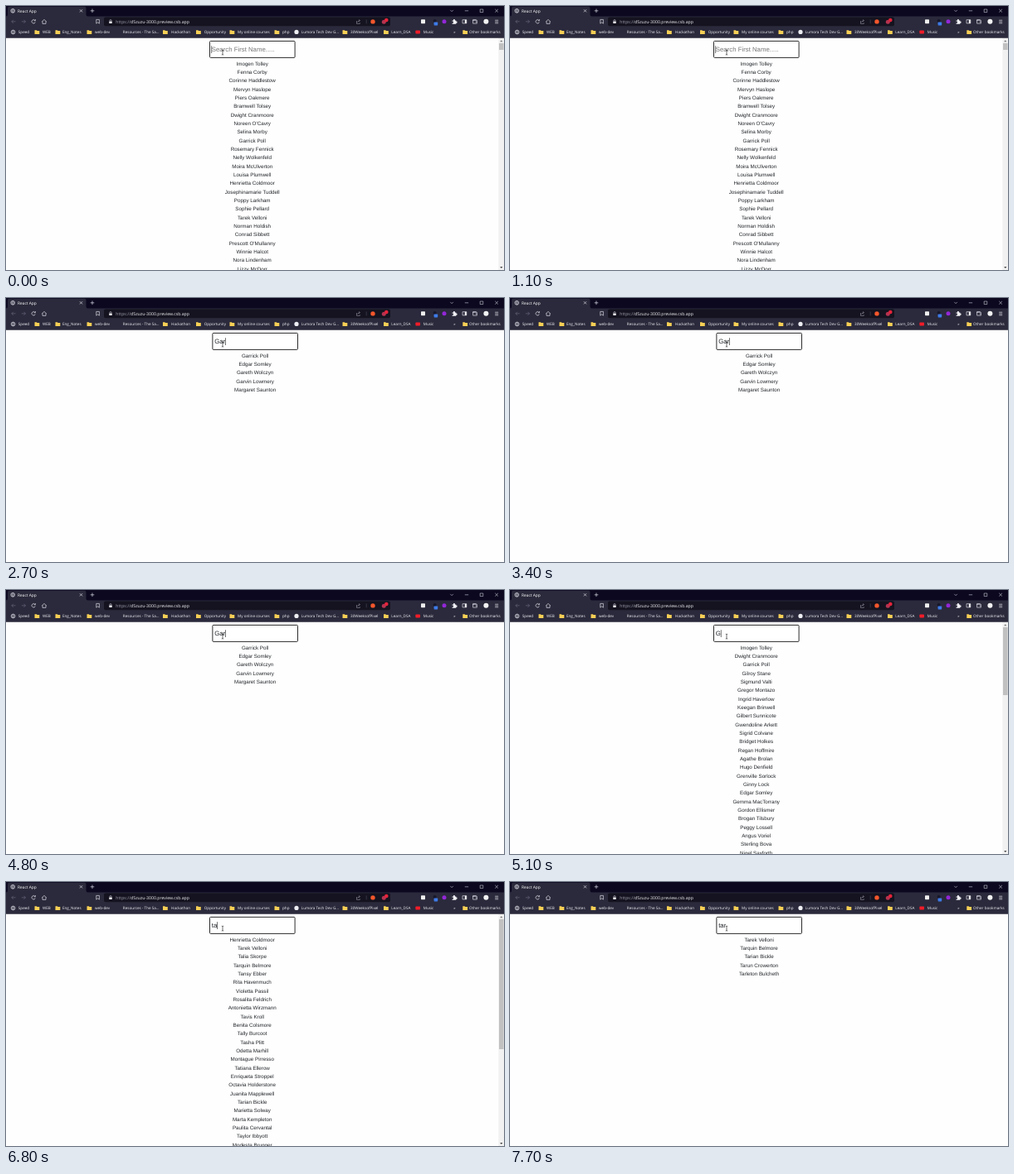
These frames come from a looping animation (600 px wide and 319 px high, 8 s). An HTML page:

```html
<!DOCTYPE html>
<html lang="en">
<head>
<meta charset="utf-8">
<title>Name search</title>
<style>
  html, body { margin: 0; width: 100%; height: 100%; overflow: hidden; background: #fff; }
  svg { display: block; width: 600px; height: 319px; }
  text { text-rendering: geometricPrecision; }
  .ui { font-family: "Open Sans", "Noto Sans", sans-serif; font-weight: 500; fill: #f2f2f6; }
  .page { font-family: "Liberation Sans", Arial, sans-serif; }
</style>
</head>
<body>
<svg id="stage" viewBox="0 0 600 319" xmlns="http://www.w3.org/2000/svg">
  <rect width="600" height="319" fill="#fefefe"/>

  <g class="page">
    <g id="column">
      <rect x="248.9" y="42.4" width="102.6" height="20" rx="1" fill="#fff" stroke="#2c2c2c"/>
      <text id="query" x="251.2" y="55.3" font-size="7.8" xml:space="preserve"></text>
      <rect id="caret" y="48.2" width="0.6" height="8.8" fill="#111"/>
      <g id="rows" font-size="6.25" fill="#212529" text-anchor="middle"></g>
    </g>
    <g id="scrollbar">
      <rect x="593.4" y="38.5" width="6.6" height="280.5" fill="#f1f1f1"/>
      <rect id="thumb" x="594" y="45" width="5.6" fill="#c1c1c1"/>
      <path d="M595.2 43.3l1.6-2 1.6 2z" fill="#777"/>
      <path d="M595.2 315l1.6 2 1.6-2z" fill="#444"/>
    </g>
    <path d="M259.8 53.2q1.2 0 1.2.8q0-.8 1.2-.8M261 54v4.4M259.8 59.1q1.2 0 1.2-.8q0 .8 1.2.8" fill="none" stroke="#222" stroke-width=".65"/>
  </g>

  <g class="ui">
    <rect width="600" height="13" fill="#0b0820"/>
    <path d="M0 38.7V12.4Q2 12.4 2 10.5V2.5Q2 .8 4 .8H94.5Q96.5 .8 96.5 2.5V10.5Q96.5 12.4 98.5 12.4H600V38.7z" fill="#2b2a3c"/>
    <rect x="118" y="13.5" width="345" height="10.8" rx="2" fill="#14131f"/>

    <g fill="none" stroke="#dcdce4" stroke-width=".7">
      <path d="M88.9 4.2l3.2 3.2m0-3.2l-3.2 3.2M101.7 5.8h4.6m-2.3-2.3v4.6"/>
      <path d="M535.3 4.9l1.8 1.8 1.8-1.8M552.8 5.8h4.4M571.2 4h3.6v3.6h-3.6zM589.2 3.8l3.8 3.8m0-3.8l-3.8 3.8" stroke-width=".55"/>
      <path d="M11.5 18.8H6.8m2-2l-2 2 2 2M18.8 18.8h4.7m-2-2l2 2-2 2" stroke="#66657a"/>
      <path d="M35 17.5a2.2 2.2 0 1 0 .3 2M35.4 16v1.8h-1.8"/>
      <path d="M43.2 19l2.8-2.6 2.8 2.6M44 18.4v3h4v-3"/>
      <path d="M108.8 16.4h3.6v4.8l-1.8-1.4-1.8 1.4z"/>
      <path d="M124.9 18.6v-.9a1.1 1.1 0 0 1 2.2 0v.9" stroke-width=".6"/>
      <path d="M422.5 18v3.4h3.8v-1.2M423.8 19.6q.2-2 2.4-2m-1-1.2l1.3 1.2-1.3 1.2" stroke="#b4b3c0" stroke-width=".5"/>
      <path d="M434.2 16.4v5" stroke="#55546a" stroke-width=".5"/>
      <path d="M550 16.7h4.8v4.2H550z"/>
      <path d="M562.6 17.3h4.8v3.8h-4.8zM562.6 18.2v-1.6h4M565.6 19.2h1.8"/>
      <path d="M589.2 17.2h4m-4 1.8h4m-4 1.8h4"/>
      <circle cx="8.2" cy="5.8" r="2.4"/>
      <path d="M6 5.2h4.2M6.4 7.1h3.6M8.2 3.4q-2 2.4 0 4.8q2-2.4 0-4.8" stroke-width=".4"/>
      <circle cx="8.6" cy="31.5" r="2.4"/>
      <path d="M6.4 30.9h4.4M6.8 32.8h3.6M8.6 29.1q-2 2.4 0 4.8q2-2.4 0-4.8" stroke-width=".4"/>
    </g>

    <rect x="124.3" y="18.4" width="3.4" height="2.7" rx=".4"/>
    <circle cx="442" cy="18.9" r="2.7" fill="#f4562c"/>
    <circle cx="455.3" cy="19.2" r="2.5" fill="#b53350"/>
    <circle cx="458.3" cy="17" r="2.3" fill="#e5243b"/>
    <rect x="500" y="16.2" width="5" height="5" rx=".7" fill="#eee"/>
    <circle cx="516.6" cy="18" r="2" fill="#17172a"/>
    <rect x="515.6" y="19.6" width="4.6" height="3.8" rx=".7" fill="#3e7bea"/>
    <circle cx="528" cy="18.7" r="2.5" fill="#9327d8"/>
    <path d="M537.6 17.4h1.4a1 1 0 1 1 1.9 0h1.4v1.3a1 1 0 1 1 0 1.9v1.2h-4.7v-1.3a1 1 0 1 0 0-1.8z"/>
    <rect x="552.8" y="16.7" width="2" height="4.2"/>
    <circle cx="578.4" cy="18.8" r="3" fill="#f2f2f2"/>

    <text x="14" y="7.6" font-size="4.85" fill="#fff">React App</text>
    <text x="132.3" y="20.8" font-size="5.2"><tspan fill="#a2a1ae">https://</tspan>d5zuzu-3000.preview.csb.app</text>
    <g id="marks" font-size="4.6"></g>
    <circle cx="350" cy="31.4" r="2.6" fill="#eceef2"/>
    <rect x="493.4" y="29.5" width="5.6" height="4" rx=".8" fill="#f01c28"/>
  </g>
</svg>
<script>
const NS = 'http://www.w3.org/2000/svg';
const $ = id => document.getElementById(id);

function add(parent, tag, attrs, text) {
  const el = document.createElementNS(NS, tag);
  for (const k in attrs) el.setAttribute(k, attrs[k]);
  if (text) el.textContent = text;
  parent.appendChild(el);
  return el;
}

// Bookmarks: label, text x, folder x (optional)
[
  ['Speed', 14.8], ['WEB', 44, 34.5], ['Eng_Notes', 68, 59.5], ['web-dev', 107, 97.5],
  ['Resources - The Sa...', 140.8], ['Hackathon', 199, 189], ['Opportunity', 238.8, 229],
  ['My online courses', 279, 269.5], ['php', 333, 323.5], ['Lumora Tech Dev G...', 355.8],
  ['30WeeksofPixel', 415, 405.5], ['Learn_DSA', 464.3, 455], ['Music', 502.8],
  ['»', 539.3], ['Other bookmarks', 558, 550.3]
].forEach(([label, x, folder]) => {
  add($('marks'), 'text', { x, y: 33.2 }, label);
  if (folder) add($('marks'), 'path', { d: `M${folder} 29.2h2.3l.8.8h2.7v4h-5.8z`, fill: '#f7cf55' });
});

const people = `Imogen Tolley,Fenna Corby,Corinne Haddlestow,Mervyn Haslope,Piers Oakmere,
Bramwell Tolsey,Dwight Cranmoore,Noreen O'Cavry,Selina Morby,Garrick Poll,Rosemary Fennick,
Nelly Wolkenfeld,Moira McUlverton,Louisa Plumwell,Henrietta Coldmoor,Josephinamarie Tuddell,
Poppy Larkham,Sophie Pellard,Tarek Velloni,Norman Holdish,Conrad Sibbett,Prescott O'Mullanny,
Winnie Halcot,Nora Lindenham,Lizzy McDorr,
Gilroy Stane,Sigmund Valti,Gregor Montazo,Ingrid Haverlow,Keegan Brinwell,Gilbert Sunnicote,
Gwendoline Arkett,Sigrid Colvane,Bridget Holkes,Regan Hoffmire,Agathe Brolan,Hugo Denfield,
Grenville Sorlock,Ginny Lock,Edgar Somley,Gemma MacTorrany,Gordon Ellismer,Brogan Tilsbury,
Peggy Lossell,Angus Voriel,Sterling Bova,Nigel Saxforth,Logan Perrow,Gavin Hurlock,
Gareth Wolczyn,Gail Tressel,Teagan Moll,Garvin Lowmery,Gaspar Prewett,Galina Corder,Margaret Saunton,
Talia Skorpe,Tarquin Belmore,Tansy Ebber,Rita Havenmuch,Violetta Passil,Rosalita Feldrich,
Antonietta Wirzmann,Tavis Kroll,Benita Colsmore,Tally Burcoot,Tasha Plitt,Odetta Marhill,
Montague Pirresso,Tatiana Ellerow,Enriqueta Stroppel,Octavia Holderstone,Juanita Mapplewell,
Tarian Bickle,Marietta Solway,Marta Kempleton,Paulita Cervantal,Taylor Ibbyott,Modesta Brunger,
Tarun Crowerton,Tarleton Bulcheth`.split(/,\s*/);

const ROWS = 25, LOOP = 8000;
const rows = Array.from({ length: ROWS }, (_, i) =>
  add($('rows'), 'text', { x: 300.1, y: 71.6 + i * 10.33 }));

// Scrollbar thumb height per query; other queries fit without scrolling
const thumbs = { '': 8, g: 82, t: 40, ta: 157 };

// Time, typed text, caret shown
const steps = [
  [0, '', 1], [400, '', 0], [900, '', 1], [1400, 'G', 1], [2000, 'G', 0], [2200, 'G', 1],
  [2500, 'Ga', 1], [2700, 'Gar', 1], [3000, 'Gar', 0], [3400, 'Gar', 1], [4000, 'Gar', 0],
  [4600, 'Gar', 1], [4900, 'Ga', 1], [5000, 'G', 1], [5200, '', 1], [5600, '', 0],
  [6100, '', 1], [6500, '', 0], [6700, 't', 1], [6800, 'ta', 1], [7000, 'tar', 1], [7600, 'tar', 0]
];

let shown = null;
function draw(ms) {
  const step = steps.filter(s => s[0] <= ms).pop();
  if (step === shown) return;
  shown = step;
  const [, typed, caretOn] = step;
  const key = typed.toLowerCase();
  const found = people.filter(p => p.split(' ')[0].toLowerCase().includes(key));
  rows.forEach((row, i) => { row.textContent = found[i] || ''; });

  const thumb = thumbs[key];
  $('scrollbar').style.display = thumb ? '' : 'none';
  $('thumb').setAttribute('height', thumb || 0);
  $('column').setAttribute('transform', `translate(${thumb ? -3.4 : 0} 0)`);

  const query = $('query');
  query.textContent = typed || 'Search First Name.....';
  query.setAttribute('fill', typed ? '#212529' : '#757575');
  $('caret').setAttribute('x', 251.2 + (typed ? query.getComputedTextLength() : -0.3));
  $('caret').style.display = caretOn ? '' : 'none';
}

const start = performance.now();
function tick() {
  draw((performance.now() - start) % LOOP);
  requestAnimationFrame(tick);
}
tick();
</script>
</body>
</html>
```
